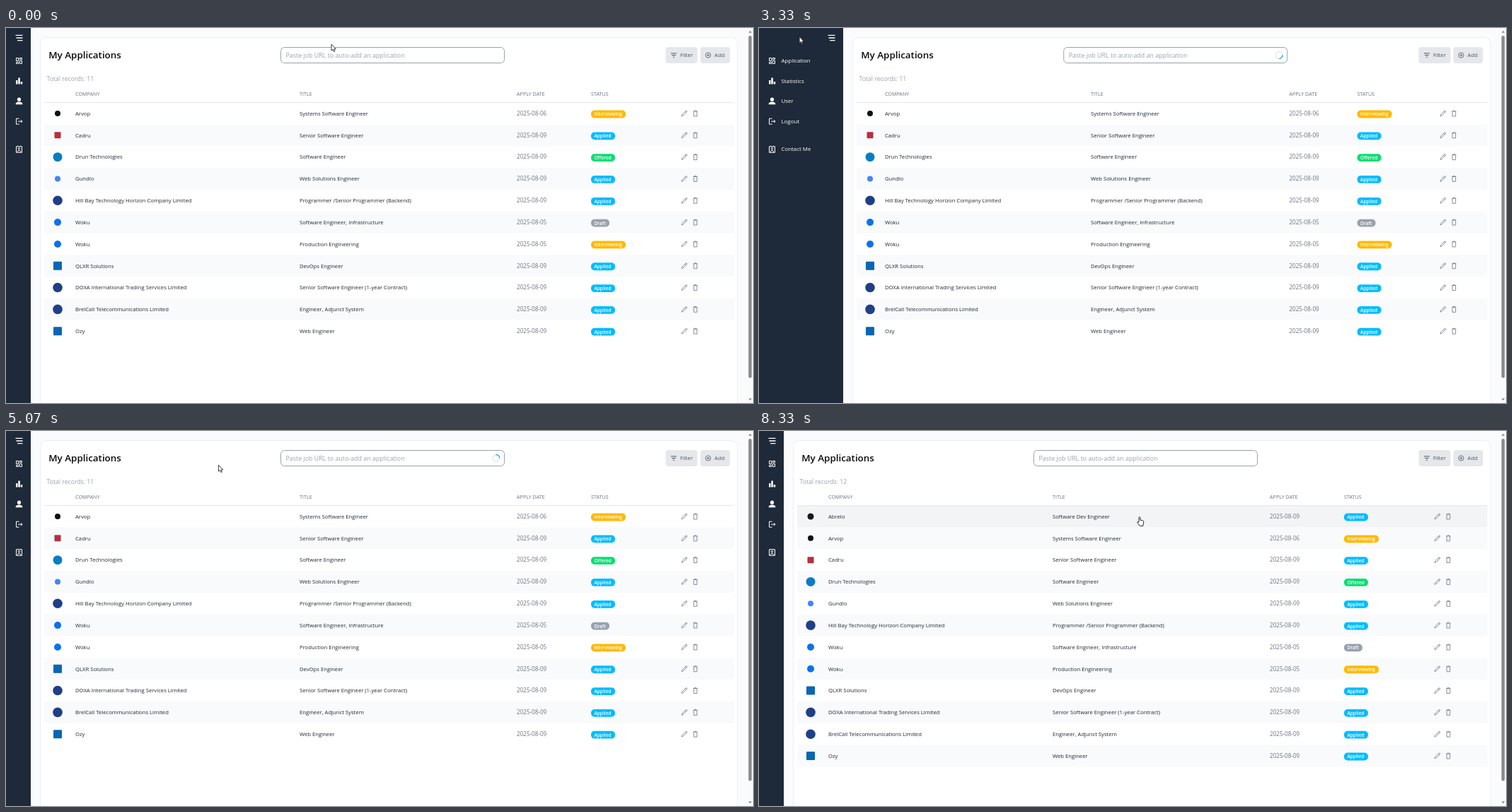
An HTML page with a canvas for the animation above (9340 ms loop, 1056x531 px).

```html
<!DOCTYPE html>
<html lang="en">
<head>
<title>My Applications</title>
<style>
html, body { margin: 0; width: 100%; height: 100%; overflow: hidden; background: #fff; }
canvas { display: block; }
</style>
</head>
<body>
<canvas id="stage" width="1056" height="531"></canvas>
<script>
const ctx = document.getElementById('stage').getContext('2d');
const LOOP = 9340, CLOSED = 35, OPEN = 119;
const OPENING = 2290, CLOSING = 4132, PASTE = 670, SUBMIT = 1000, ADDED = 6130;
const ROW_TOP = 105.6, ROW_H = 30.82;
const URL_TEXT = 'https://www.example.com/en/jobs/2948113/software-dev-engineer';
const INK = '#1e2939', GRAY = '#6a7282', PALE = '#99a1af';

// status: label, pill width, colour
const STATUS = {
  I: ['Interviewing', 49, '#ffb900'],
  A: ['Applied', 34, '#00bcff'],
  O: ['Offered', 34, '#05df72'],
  D: ['Draft', 26, '#99a1af']
};
// company, title, day, status, icon shape, icon radius, icon colour
const ROWS = [
  ['Abrelo', 'Software Dev Engineer', 9, 'A', 'dot', 4.5, '#191919'],
  ['Arvop', 'Systems Software Engineer', 6, 'I', 'dot', 4, '#111111'],
  ['Cadru', 'Senior Software Engineer', 9, 'A', 'box', 4.5, '#b5303f'],
  ['Drun Technologies', 'Software Engineer', 9, 'O', 'dot', 6.5, '#0a7dc2'],
  ['Gundlo', 'Web Solutions Engineer', 9, 'A', 'dot', 4, '#4285f4'],
  ['Hill Bay Technology Horizon Company Limited', 'Programmer /Senior Programmer (Backend)', 9, 'A', 'dot', 6.8, '#1f3f86'],
  ['Woku', 'Software Engineer, Infrastructure', 5, 'D', 'dot', 5, '#0a72ee'],
  ['Woku', 'Production Engineering', 5, 'I', 'dot', 5, '#0a72ee'],
  ['QLXR Solutions', 'DevOps Engineer', 9, 'A', 'box', 6, '#0a66b2'],
  ['DOXA International Trading Services Limited', 'Senior Software Engineer (1-year Contract)', 9, 'A', 'dot', 6.8, '#1f3f86'],
  ['BrelCall Telecommunications Limited', 'Engineer, Adjunct System', 9, 'A', 'dot', 6.8, '#1f3f86'],
  ['Ozy', 'Web Engineer', 9, 'A', 'box', 6, '#0a66b2']
];

// pointer path: time, x, y
const PATH = [
  [0, 460, 23], [130, 460, 23], [200, 462, 30], [270, 463.5, 35.5], [1000, 463.5, 35.5],
  [1930, 68, 13], [2070, 24, 12.5], [2200, 24, 12.5], [2400, 31, 12], [3000, 31, 12],
  [3900, 102, 12.5], [4130, 102, 12.5], [4200, 120, 15], [4600, 120, 15], [5000, 219, 36],
  [5070, 300, 48], [5400, 448, 64], [6600, 448, 64], [6950, 470, 150], [7530, 442, 117],
  [7600, 442, 117], [8000, 540.5, 126], [8270, 540.5, 126], [8330, 538, 121.5], [LOOP, 538, 121.5]
];

const SIDE = [
  [46, 'Application', 'M-4 -4h3.2v4h-3.2zM.8 -4h3.2v2h-3.2zM-4 2h3.2v2h-3.2zM.8 0h3.2v4h-3.2z', 0],
  [74.6, 'Statistics', 'M-4.5 -1h2.5v5.5h-2.5zM-1.2 -4.5h2.5v9h-2.5zM2.2 1h2.5v3.5h-2.5z', 1],
  [103.2, 'User', 'M0 -5a2.6 2.6 0 1 1 0 5.2a2.6 2.6 0 1 1 0 -5.2zM-4.8 4.7v-1.2q.6 -2.5 4.8 -2.5t4.8 2.5v1.2z', 1],
  [131.8, 'Logout', 'M0 -4h-4v8h4M-1.5 0h6M2.5 -2l2 2l-2 2', 0],
  [171.4, 'Contact Me', 'M-4 -4h8v8.5h-8zM-2 -5v1M2 -5v1M0 -2.3a1.3 1.3 0 1 1 0 2.6a1.3 1.3 0 1 1 0 -2.6zM-2.4 4q.3 -2.4 2.4 -2.4t2.4 2.4', 0]
];

const PENCIL = 'M-3.8 3.8l.6 -2.2l5.2 -5.2q.7 -.6 1.4 0t0 1.5l-5.2 5.2zM1.2 -2.8l1.5 1.5';
const TRASH = 'M-3 -3h6M-1.2 -3v-.9h2.4v.9M-2.3 -3v7h4.6v-7';
const ARROW = 'M0 0V9.2L2.1 7.3L3.5 10.5L4.9 9.9L3.6 6.8H6.3Z';
const HAND = 'M-1 1Q0 -.5 1 1V4.6L4.7 5.4Q6 5.8 5.8 7.6L5 11V12.8H.2L-2.8 8.8Q-3.6 7.4 -2.5 6.9L-1 7.8Z';
const BEAM = 'M-2 -4.2h1.4q.6 0 .6 .6v7.2q0 .6 -.6 .6h-1.4M2 -4.2h-1.4q-.6 0 -.6 .6M2 4.2h-1.4q-.6 0 -.6 -.6';

function text(s, x, y, size, color, weight = 400) {
  ctx.font = `${weight} ${size}px "Open Sans", "Noto Sans", sans-serif`;
  ctx.fillStyle = color;
  ctx.fillText(s, x, y);
}

function rect(x, y, w, h, fill, r = 0, line) {
  ctx.beginPath();
  ctx.roundRect(x, y, w, h, r);
  ctx.fillStyle = fill;
  ctx.fill();
  if (line) { ctx.strokeStyle = line; ctx.lineWidth = 1; ctx.stroke(); }
}

function shape(d, x, y, fill, line, width = 1) {
  const p = new Path2D(d);
  ctx.save();
  ctx.translate(x, y);
  ctx.lineJoin = 'round';
  if (fill) { ctx.fillStyle = fill; ctx.fill(p); }
  if (line) { ctx.strokeStyle = line; ctx.lineWidth = width; ctx.stroke(p); }
  ctx.restore();
}

function circle(x, y, r, fill) {
  ctx.beginPath();
  ctx.arc(x, y, r, 0, 7);
  ctx.fillStyle = fill;
  ctx.fill();
}

// the CSS "ease" curve, cubic-bezier(.25, .1, .25, 1)
function ease(x) {
  if (x <= 0) return 0;
  if (x >= 1) return 1;
  const bez = (u, a, b) => 3 * u * (1 - u) * (1 - u) * a + 3 * u * u * (1 - u) * b + u * u * u;
  let lo = 0, hi = 1;
  for (let i = 0; i < 20; i++) {
    const mid = (lo + hi) / 2;
    if (bez(mid, .25, .25) < x) lo = mid; else hi = mid;
  }
  return bez(lo, .1, 1);
}

const drawer = (t, ms) =>
  CLOSED + (OPEN - CLOSED) * (ease((t - OPENING) / ms) - ease((t - CLOSING) / ms));

function pointer(t) {
  const i = PATH.findIndex(p => p[0] > t);
  const [t0, x0, y0] = PATH[i - 1], [t1, x1, y1] = PATH[i];
  const f = (t - t0) / (t1 - t0);
  return [x0 + (x1 - x0) * f, y0 + (y1 - y0) * f];
}

function drawInput(t, x) {
  const focus = t >= 270 && t < SUBMIT, filled = t >= PASTE && t < SUBMIT;
  rect(x + .5, 27.5, 316, 22, '#fff', 5, focus ? GRAY : PALE);
  const label = filled ? URL_TEXT : 'Paste job URL to auto-add an application';
  text(label, x + 7.5, 41.8, 8.9, filled ? INK : PALE);
  if (focus) rect(x + 7 + (filled ? ctx.measureText(label).width : 0), 33.5, .7, 10, INK);
  if (t >= SUBMIT && t < ADDED) {
    const a = (t * .36 - 75) * Math.PI / 180;
    const arc = (from, to, color, width) => {
      ctx.beginPath();
      ctx.arc(x + 305, 38.5, 4.9, from, to);
      ctx.strokeStyle = color;
      ctx.lineWidth = width;
      ctx.stroke();
    };
    arc(0, 7, '#d1d5dc', .9);
    arc(a - .8, a + .8, '#00a6f4', 1.2);
  }
}

function drawButtons() {
  rect(932.5, 27, 45, 23, '#e5e7eb', 4);
  shape('M-4 -2.6h8M-2.7 0h5.4M-1.2 2.6h2.4', 944, 38.5, null, '#4a5565');
  text('Filter', 953, 41.3, 7.7, '#4a5565');
  rect(981.5, 27, 42, 23, '#e5e7eb', 4);
  shape('M-3.6 0a3.6 3.6 0 1 1 7.2 0a3.6 3.6 0 1 1 -7.2 0M-1.9 0h3.8M0 -1.9v3.8', 992.6, 38.5, null, '#4a5565', .8);
  text('Add', 1001.6, 41.3, 7.7, '#4a5565');
}

function drawTable(rows, left, k, hover) {
  const company = 98 + 78.5 * k, title = 415 + 53 * k, date = 722 + 27 * k;
  const status = 827 + 18.3 * k, tools = 959 + 7.8 * k;
  text('Total records: ' + rows.length, left + 8.5, 75.2, 8.7, PALE);
  text('COMPANY', company, 96.4, 7.2, GRAY);
  text('TITLE', title, 96.4, 7.2, GRAY);
  text('APPLY DATE', date, 96.4, 7.2, GRAY);
  text('STATUS', status, 96.4, 7.2, GRAY);
  rows.forEach(([name, job, day, state, kind, r, color], i) => {
    const top = ROW_TOP + ROW_H * i, y = 121 + ROW_H * i;
    rect(left + 5, top, 1029.5 - left - 5, ROW_H, i === hover ? '#f3f4f6' : i % 2 ? '#f9fafb' : '#fff');
    if (kind === 'dot') circle(left + 24, y, r, color);
    else rect(left + 24 - r, y - r, 2 * r, 2 * r, color, 1);
    text(name, company, y + 2.8, 7.7, INK);
    text(job, title, y + 2.8, 7.7, INK);
    text('2025-08-0' + day, date, y + 2.8, 8.1, GRAY);
    const [label, width, fill] = STATUS[state];
    rect(status, y - 4.4, width, 10.8, fill, 5);
    text(label, status + 4.4, y + 3.4, 6.6, '#fff', 600);
    shape(PENCIL, tools, y, null, GRAY, .8);
    shape(TRASH, tools + 15.5, y, null, GRAY, .8);
  });
  rect(left + 5, 105, 1029.5 - left - 5, 1, '#e5e7eb');
}

function drawSidebar(t, w) {
  rect(0, 0, w, 531, INK);
  shape('M-5 -3.7h10M-4 0h9M-2.5 3.7h7.5', w - 16.5, 14, null, '#fff', 1.3);
  const labels = t >= 3000 && t < CLOSING + 300;
  ctx.save();
  ctx.beginPath();
  ctx.rect(0, 0, w, 531);
  ctx.clip();
  for (const [y, label, d, solid] of SIDE) {
    shape(d, 18.5, y + .4, solid ? '#fff' : null, solid ? null : '#fff', 1);
    if (labels) text(label, 31.5, y + 2.9, 7.9, '#fff');
  }
  ctx.restore();
}

function drawScrollbar() {
  rect(1048, 0, 8, 531, '#fafafa');
  rect(1049.6, 11, 4.6, 484.5, '#8b8b8b', 2.3);
  shape('M-2.4 1.4L0 -1.6L2.4 1.4Z', 1052, 5.3, '#8b8b8b');
  shape('M-2.4 -1.4L0 1.6L2.4 -1.4Z', 1052, 526, '#8b8b8b');
}

function drawPointer(t, x, y, menuX) {
  if (t >= 470 && t < SUBMIT) return;
  const overMenu = Math.abs(x - menuX) < 7 && y < 20;
  const overInput = x > 388 && x < 705 && y > 27 && y < 50;
  if (overMenu || y > ROW_TOP) shape(HAND, x, y, '#fff', '#111', .9);
  else if (overInput) shape(BEAM, x, y, null, '#111', .9);
  else shape(ARROW, x, y, '#fff', '#111', .8);
}

function draw(t) {
  const side = drawer(t, 300), page = drawer(t, 500);
  const left = page + 14, k = (left - 49) / 82.5;
  const [x, y] = pointer(t);
  const hover = y > ROW_TOP ? Math.floor((y - ROW_TOP) / ROW_H) : -1;
  rect(0, 0, 1056, 531, '#fff');
  rect(page, 0, 1056 - page, 531, '#fafbfc');
  rect(left - .5, 13.5, 1034.5 - left, 540, '#fff', 8, '#eceef1');
  text('My Applications', left + 11.2, 43, 13.4, '#0a0a0a', 600);
  drawInput(t, 388 + 41.5 * k);
  drawButtons();
  drawTable(t < ADDED ? ROWS.slice(1) : ROWS, left, k, hover);
  drawScrollbar();
  drawSidebar(t, side);
  drawPointer(t, x, y, side - 16.5);
}

const start = performance.now();
function tick() {
  draw((performance.now() - start) % LOOP);
  requestAnimationFrame(tick);
}
tick();
</script>
</body>
</html>
```
